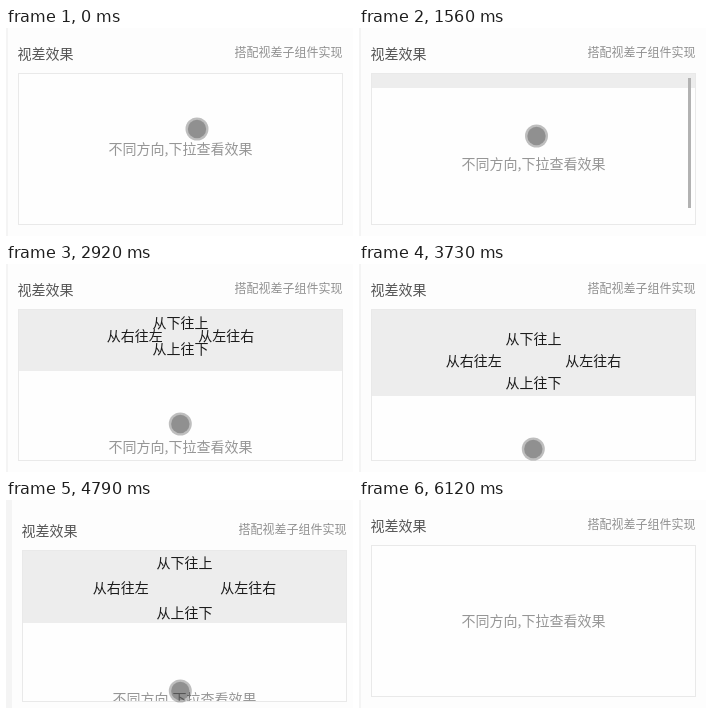
An HTML page for the animation above (6790 ms loop, 347 by 208 pixels).

```html
<!DOCTYPE html>
<html lang="zh-CN">
<head>
<meta charset="utf-8">
<title>视差效果</title>
<style>
  html, body { margin: 0; width: 100%; height: 100%; overflow: hidden; background: #fdfdfd; }
  svg { display: block; width: 100%; height: 100%; }
  text { font: 14px "Noto Sans CJK SC", "Noto Sans CJK", sans-serif; }
  .item { fill: #1c1c1c; text-anchor: middle; }
</style>
</head>
<body>
<svg viewBox="0 0 347 208">
  <defs><clipPath id="inside"><rect x="13" y="46" width="323" height="150"/></clipPath></defs>
  <rect width="347" height="208" fill="#fdfdfd"/>
  <g id="page">
    <rect x="-10" y="-10" width="12" height="228" fill="#f4f4f4"/>
    <text x="11.5" y="31" fill="#555">视差效果</text>
    <text x="336.5" y="29" text-anchor="end" fill="#909090" style="font-size:12px">搭配视差子组件实现</text>
    <rect x="12.5" y="45.5" width="324" height="151" fill="#fefefe" stroke="#e9e9e9"/>
    <g clip-path="url(#inside)">
      <rect id="band" x="13" y="45" width="323" fill="#ededed"/>
      <g id="items">
        <text class="item">从右往左</text>
        <text class="item">从左往右</text>
        <text class="item">从下往上</text>
        <text class="item">从上往下</text>
      </g>
      <text id="hint" x="174.5" y="126" text-anchor="middle" fill="#969696">不同方向,下拉查看效果</text>
    </g>
    <rect id="scrollbar" x="329" y="50" width="3" height="130" fill="#b2b2b2"/>
  </g>
  <g id="pointer">
    <circle r="11.5" opacity=".25"/>
    <circle r="9.2" opacity=".24"/>
  </g>
</svg>
<script>
const LOOP = 6790;
const TICK = 134;        // the screen refreshes once per tick
const TICK_SHIFT = 51;
const CENTER_X = 174.5;
const MAX_PULL = 93;
const LOCKED_PULL = 66;

// [tick, distance] the finger has pulled the panel down
const dragPath = [[11, 0], [12, 15], [16, 32], [22, 62], [28, 87], [32, MAX_PULL]];

const mix = (a, b, p) => a + (b - a) * p;
const ramp = (x, from, to) => Math.min(1, Math.max(0, (x - from) / (to - from)));
const smooth = p => p * p * (3 - 2 * p);

function dragAt(tick) {
  const i = dragPath.findIndex(([key]) => key > tick);
  if (i === 0) return 0;
  if (i < 0) return MAX_PULL;
  const [t0, a] = dragPath[i - 1], [t1, b] = dragPath[i];
  return mix(a, b, ramp(tick, t0, t1));
}

function pullAt(tick) {
  if (tick < 34) return dragAt(tick);
  const settled = mix(MAX_PULL, LOCKED_PULL, smooth(ramp(tick, 34, 37)));
  return settled * (1 - ramp(tick, 41, 44));
}

const byId = id => document.getElementById(id);
const move = (element, x, y) => element.setAttribute("transform", `translate(${x} ${y})`);
const fade = (element, opacity) => element.setAttribute("opacity", opacity);
const [left, right, upper, lower] = byId("items").children;

function drawPanel(tick) {
  const pull = Math.round(pullAt(tick));
  byId("band").setAttribute("height", pull);
  move(byId("hint"), 0, pull);

  // Items spread with the drag and stay apart after the release.
  const drag = dragAt(tick);
  const dx = 26 + .14 * drag + .00285 * drag ** 2;
  const dy = Math.max(0, .385 * drag - 11.2);
  const y = 15 + pull;
  move(left, CENTER_X - dx, y);
  move(right, CENTER_X + dx, y);
  move(upper, CENTER_X, y - dy);
  move(lower, CENTER_X, y + dy);
  fade(byId("items"), pull ? 1 : 0);

  fade(byId("scrollbar"), tick < 12 ? 0 : Math.max(0, 1 - .6 * (tick - 12)));

  const shake = tick < 36 ? 0 : (1 - ramp(tick, 36, 38)) ** 2;
  move(byId("page"), 4 * shake, 5 * shake);
}

function drawPointer(tick) {
  const pointer = byId("pointer");
  if (tick < 4) {
    move(pointer, 191, 101);
    fade(pointer, 1 - ramp(tick, 0, 3));
    return;
  }
  const x = mix(177.5, 174.3, smooth(ramp(tick, 12, 20)));
  const y = Math.min(87 + 7 * Math.max(0, tick - 9), 98 + dragAt(tick));
  move(pointer, x, y);
  fade(pointer, ramp(tick, 4, 6) - ramp(tick, 44, 46));
}

const start = performance.now();
function frame() {
  const time = (performance.now() - start) % LOOP;
  const tick = Math.floor((time + TICK_SHIFT) / TICK);
  drawPanel(tick);
  drawPointer(tick);
  requestAnimationFrame(frame);
}
frame();
</script>
</body>
</html>
```
